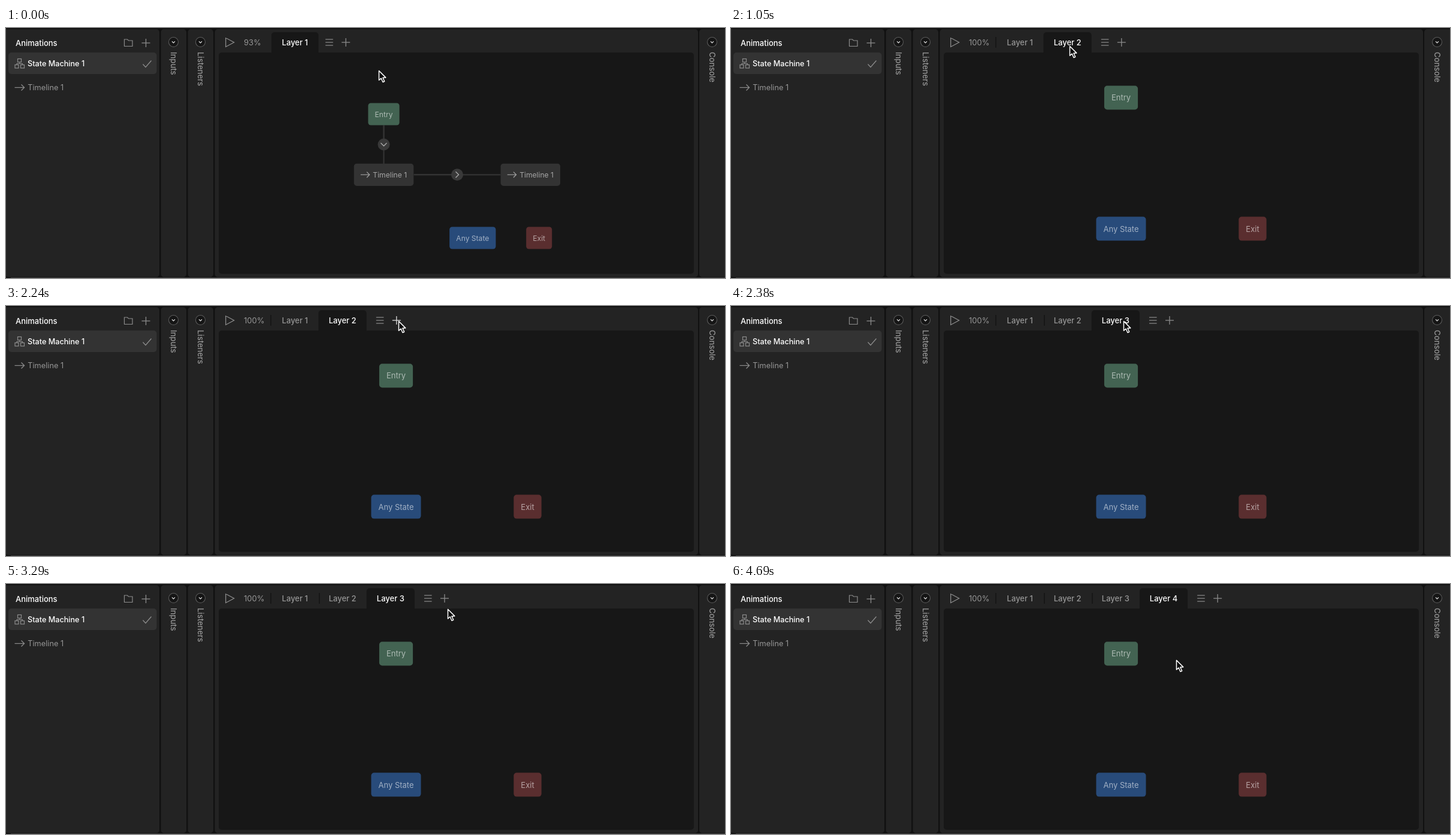
Recreate the animation shown at these times as an HTML page with a canvas. Size 1200 px wide and 418 px high, loop 4.76 s.

```html
<!DOCTYPE html>
<html lang="en">
<head>
<meta charset="utf-8">
<title>Adding state machine layers</title>
<style>
  html, body { margin: 0; width: 100%; height: 100%; overflow: hidden; background: #111; }
  canvas { display: block; }
</style>
</head>
<body>
<canvas id="stage" width="1200" height="418"></canvas>
<script>
const ctx = document.getElementById('stage').getContext('2d');
const LOOP = 4760, STEP = 70;
const PANEL = '#232323', DARK = '#171717', NODE = '#333333';
const GREY = '#8c8c8c', TEXT = '#969696', WHITE = '#ffffff';
const GREEN = '#436352', BLUE = '#284b7a', RED = '#5a2e2f';

const TAB_WIDTH = 80.2;
const ADDED = [1050, 2310, 3990]; // when each new layer appears

// The pointer rests between glides; each round ends on the plus button
const REST = { x: 622, y: 71 };
const GLIDES = [
  { start: 280, time: 350, x: 567, y: 45 },
  { start: 630, time: 140, x: 565, y: 30 },
  { start: 1260, time: 560, x: 650, y: 45, sag: 22 },
  { start: 1820, time: 420, x: 655, y: 25 },
  { start: 2660, time: 560, x: 737, y: 43, sag: 20 },
  { start: 3220, time: 350, x: 737, y: 31 },
  { start: 4480, time: 210, x: 743, y: 127 }
];

function box(x, y, w, h, r, fill) {
  ctx.beginPath();
  ctx.roundRect(x, y, w, h, r);
  ctx.fillStyle = fill;
  ctx.fill();
}

function line(color, width, ...xy) {
  ctx.beginPath();
  for (let i = 0; i < xy.length; i += 2) ctx.lineTo(xy[i], xy[i + 1]);
  ctx.strokeStyle = color;
  ctx.lineWidth = width;
  ctx.stroke();
}

function circle(x, y, r, fill) {
  ctx.beginPath();
  ctx.arc(x, y, r, 0, Math.PI * 2);
  ctx.fillStyle = fill;
  ctx.fill();
}

// Draws in a local frame moved to x, y
function at(x, y, paint, turn = 0, zoom = 1) {
  ctx.save();
  ctx.translate(x, y);
  ctx.rotate(turn);
  ctx.scale(zoom, zoom);
  paint();
  ctx.restore();
}

function setFont(size, weight = 400) {
  ctx.font = `${weight} ${size}px Inter, sans-serif`;
}

// Text centred on y by cap height
function label(str, x, y, color, { weight = 400, size = 13, align = 'left' } = {}) {
  setFont(size, weight);
  ctx.textAlign = align;
  ctx.fillStyle = color;
  ctx.fillText(str, x, y + size * 0.36);
}

function plus(x, y, color) {
  line(color, 1.3, x - 7, y, x + 7, y);
  line(color, 1.3, x, y - 7, x, y + 7);
}

function chevron(x, y, size, color, turn = 0) {
  at(x, y, () => line(color, 1.3, -size, -size / 2, 0, size / 2, size, -size / 2), turn);
}

function arrow(x, y, color) {
  line(color, 1.2, x, y, x + 16, y);
  chevron(x + 13.5, y, 5, color, -Math.PI / 2);
}

function sidePanel(x, w, cx, name) {
  box(x, 2, w, 414.5, 5, PANEL);
  circle(cx, 23.5, 8.5, '#5c5c5c');
  circle(cx, 23.5, 7.5, '#151515');
  chevron(cx, 23.6, 2.5, '#e4e4e4');
  at(cx, 40, () => label(name, 0, 0, TEXT, { weight: 500 }), Math.PI / 2);
}

function animationsPanel() {
  box(-6, 2, 262, 414.5, [0, 5, 5, 12], PANEL);
  label('Animations', 16, 25, WHITE, { weight: 500 });
  line(GREY, 1.2, 197.5, 30.5, 197.5, 19, 202.5, 19, 204.5, 21, 211, 21, 211, 30.5, 196.9, 30.5);
  plus(233.5, 25, GREY);

  box(4, 41, 247.5, 36, 5, NODE);
  line(GREY, 1.2, 18, 61.5, 18, 59.5, 27.5, 59.5, 27.5, 61.5);
  line(GREY, 1.2, 22.7, 57.5, 22.7, 59.5);
  for (const [x, y] of [[19.5, 51.5], [15, 61.5], [24.5, 61.5]]) ctx.strokeRect(x, y, 6, 5.5);
  label('State Machine 1', 36, 59.3, WHITE, { weight: 500, size: 12.65 });
  line(GREY, 1.3, 228.5, 60.5, 233, 65.5, 242.5, 54.5);

  arrow(14.5, 99.5, GREY);
  label('Timeline 1', 36.3, 99.8, TEXT, { size: 12.75 });
}

function tabBar(count, tip) {
  line(GREY, 1.3, 366.7, 16.5, 380.6, 24, 366.7, 31.5, 366.7, 15.9);
  label(count === 1 ? '93%' : '100%', 397, 24, TEXT);

  const edge = i => 441.3 + TAB_WIDTH * i;
  for (let i = 0; i < count; i++) {
    const left = Math.max(443, edge(i)), right = edge(i + 1);
    const active = i === count - 1;
    if (active) box(left, 7, right - left, 35, [5, 5, 0, 0], DARK);
    else box(Math.round(edge(i)), 15, 2, 18, 0, DARK);
    label('Layer ' + (i + 1), (left + right) / 2, 24, active ? WHITE : TEXT,
      { weight: 500, align: 'center' });
  }

  const menuX = edge(count) + (count === 1 ? 18 : 22.4), plusX = menuX + 27.7;
  for (const y of [19, 24, 29]) line(GREY, 1.2, menuX - 6.3, y, menuX + 6.3, y);
  const hover = Math.hypot(tip.x - plusX, tip.y - 24) < 10;
  plus(plusX, 24, hover ? '#dcdcdc' : GREY);
}

// A state box sized by its text, centred on x, y
function node(str, x, y, fill, zoom = 1, icon = 0) {
  at(x, y, () => {
    setFont(13);
    const w = ctx.measureText(str).width + 24 + icon;
    box(-w / 2, -20, w, 40, 5, fill);
    if (icon) arrow(12 - w / 2, 0, '#a2a2a2');
    label(str, icon / 2, 0.3, 'rgba(255,255,255,0.56)', { align: 'center' });
  }, 0, zoom);
}

function link(x, y, x2, y2) {
  const mx = (x + x2) / 2, my = (y + y2) / 2;
  line(NODE, 2.6, x, y, mx, my);
  line(NODE, 2.2, mx, my, x2, y2);
  circle(mx, my, 10, '#393939');
  chevron(mx, my, 5, '#aaaaaa', Math.atan2(y2 - y, x2 - x) - Math.PI / 2);
}

function firstGraph() {
  const zoom = 0.93;
  link(630.5, 162.5, 630.5, 227);
  link(680.5, 245.3, 825.5, 245.3);
  node('Entry', 630.5, 144, GREEN, zoom);
  for (const x of [630.5, 875.3]) node('Timeline 1', x, 245.3, NODE, zoom, 22);
  node('Any State', 778.8, 351, BLUE, zoom);
  node('Exit', 889.7, 351, RED, zoom);
}

function emptyGraph() {
  node('Entry', 651, 116.5, GREEN);
  node('Any State', 651, 335.6, BLUE);
  node('Exit', 870.5, 335.6, RED);
}

function tipAt(t) {
  let { x, y } = REST;
  for (const g of GLIDES) {
    const u = Math.min(1, Math.max(0, (t - g.start) / g.time));
    const s = u * u * (3 - 2 * u);
    x += (g.x - x) * s;
    y += (g.y - y) * s + (g.sag || 0) * 4 * s * (1 - s);
  }
  return { x, y };
}

function pointer({ x, y }) {
  at(x + 0.5, y + 0.5, () => {
    const shape = new Path2D('M0 0V15.8L3.6 12.5L6.5 19L9.2 17.8L6.4 11.6L11.3 11.4Z');
    ctx.fillStyle = '#0a0a0a';
    ctx.fill(shape);
    ctx.lineJoin = 'round';
    ctx.strokeStyle = WHITE;
    ctx.lineWidth = 1.5;
    ctx.stroke(shape);
  });
}

function draw(t) {
  const count = 1 + ADDED.filter(time => t >= time).length;
  const tip = tipAt(t);
  box(0, 0, 1200, 418, 0, '#111111');
  box(8, 417, 1192, 1, 0, '#3c3c3c');
  animationsPanel();
  sidePanel(258.5, 42.5, 279.5, 'Inputs');
  sidePanel(303.5, 42.5, 324.5, 'Listeners');
  sidePanel(1157, 49, 1178.5, 'Console');
  box(348.5, 2, 806.5, 414.5, 5, PANEL);
  box(355, 41, 793, 370, 5, DARK);
  tabBar(count, tip);
  if (count === 1) firstGraph(); else emptyGraph();
  pointer(tip);
}

function frame() {
  const t = performance.now() % LOOP;
  draw(Math.floor(t / STEP) * STEP);
  requestAnimationFrame(frame);
}
frame();
</script>
</body>
</html>
```
